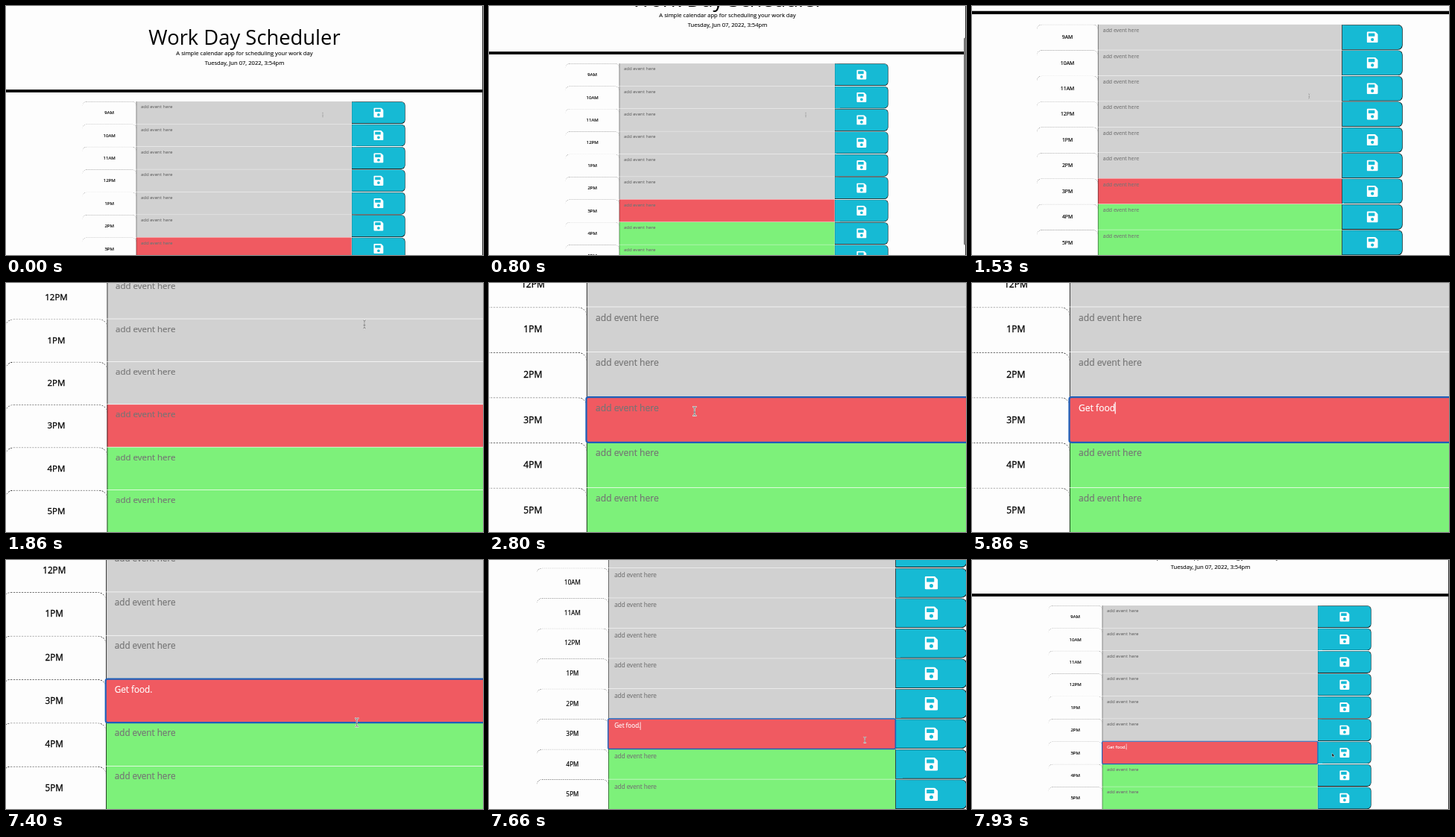
An HTML page for the animation above (8000 ms loop, 640 by 334 pixels).

```html
<!DOCTYPE html>
<html lang="en">
<head>
<meta charset="utf-8">
<title>Work Day Scheduler</title>
<style>
  html, body { margin: 0; width: 100%; height: 100%; overflow: hidden; background: #fdfdfd; }
  #stage { position: relative; width: 640px; height: 334px; overflow: hidden; }
  #camera { position: absolute; inset: 0; transform-origin: 219px 334px; }
  #page {
    position: absolute; left: 0; top: 0; width: 1684px; height: 1057px;
    transform-origin: 0 0; font: 16px/24px "Open Sans", sans-serif; color: #000;
  }
  header { position: absolute; inset: 0 0 auto; height: 295px; border-bottom: 10px solid #000; text-align: center; }
  header > * { position: absolute; left: 0; width: 100%; margin: 0; font-weight: 400; }
  h1 { top: 66px; font-size: 72px; line-height: 86.4px; }
  p { font-size: 20px; line-height: 30px; -webkit-text-stroke: .25px; }
  main { position: absolute; left: 270px; top: 336px; width: 1140px; -webkit-text-stroke: .25px; }
  .row { display: grid; grid-template-columns: 190px 760px 190px; height: 79px; border-top: 1px solid #fff; }
  .hour { border-top: 1px dashed #000; border-radius: 15px; text-align: center; line-height: 77px; -webkit-text-stroke: .4px; }
  .event { position: relative; box-sizing: border-box; padding: 6px 15px; border-left: 1px solid #000; color: #757575; white-space: pre; }
  .past { background: #d1d1d1; }
  .present { background: #f05a61; }
  .future { background: #7df17a; }
  .focus { outline: 3px solid #1f5fb8; outline-offset: -1px; border-radius: 3px; border-color: transparent; z-index: 1; }
  .typed { color: #fff; }
  #caret { position: absolute; width: 2px; height: 21px; margin: 2px 0 0 -1px; background: #fbdcde; }
  .save { box-sizing: border-box; border: 2px solid #111; border-top-color: #444; border-radius: 0 15px 15px 0; background: #16bad4; display: grid; place-items: center; }
  .save svg { width: 35px; height: 35px; }
  #edge { position: absolute; left: 639px; top: 0; width: 1px; height: 334px; background: #333; }
  #thumb { position: absolute; left: 636.5px; top: 0; width: 3px; height: 278px; border-radius: 2px; background: #777; }
  #pointer { position: absolute; left: 0; top: 0; width: 1px; height: 1px; overflow: visible; }
</style>
</head>
<body>
<div id="stage">
  <div id="camera">
    <div id="page">
      <header>
        <h1>Work Day Scheduler</h1>
        <p style="top:152px">A simple calendar app for scheduling your work day</p>
        <p style="top:187px">Tuesday, Jun 07, 2022, 3:54pm</p>
      </header>
      <main></main>
    </div>
    <div id="edge"></div>
    <div id="thumb"></div>
    <svg id="pointer">
      <g id="beam" fill="none">
        <path d="M-1.4-3Q0-3 0-2Q0-3 1.4-3M0-2V2M-1.4 3Q0 3 0 2Q0 3 1.4 3" stroke="#eee"/>
        <path d="M-1.2-3Q0-3 0-2Q0-3 1.2-3M0-2V2M-1.2 3Q0 3 0 2Q0 3 1.2 3M-.7 .6H.7" stroke="#666" stroke-width=".4"/>
      </g>
      <path id="arrow" d="M0 0V5L1.2 4 2 5.8 2.9 5.4 2.1 3.7H3.7Z" fill="#111" stroke="#fff" stroke-width=".4"/>
    </svg>
  </div>
</div>
<script>
const LOOP = 8000, PAGE_SCALE = 0.38, MAX_SCROLL = 67, MAX_ZOOM = 1.993;
const FOCUS_AT = 2200, MESSAGE = "Get food.";
const keyTimes = [...MESSAGE].map((_, i) => i < 8 ? 4200 + i * 200 : 6450);
// Pointer stops: time, x, y in unzoomed stage pixels
const stops = [[0, 425, 146], [1650, 425, 146], [2150, 247.5, 252.7], [7050, 247.5, 252.7], [7400, 350, 273.6], [7850, 483, 259]];

const $ = id => document.getElementById(id);
const clamp = v => Math.min(1, Math.max(0, v));
const ease = (t, start, end) => (1 - Math.cos(Math.PI * clamp((t - start) / (end - start)))) / 2;
const show = (node, on) => { node.style.display = on ? "" : "none"; };

const icon = `<svg viewBox="0 0 28 28"><path fill="#fff" fill-rule="evenodd" d="M3 0H19.8Q21 0 21.9.9L27.1 6.1Q28 7 28 8.2V25Q28 28 25 28H3Q0 28 0 25V3Q0 0 3 0ZM4.8 4Q4 4 4 4.8V11.2Q4 12 4.8 12H19.2Q20 12 20 11.2V5L19 4ZM14 16A4 4 0 0 0 14 24A4 4 0 0 0 14 16Z"/></svg>`;
const hours = ["9AM", "10AM", "11AM", "12PM", "1PM", "2PM", "3PM", "4PM", "5PM"];
document.querySelector("main").innerHTML = hours.map((hour, i) => {
  const phase = i < 6 ? "past" : i > 6 ? "future" : "present";
  return `<div class="row"><div class="hour">${hour}</div>
    <div class="event ${phase}">add event here</div><div class="save">${icon}</div></div>`;
}).join("");

const field = document.querySelector(".present");
field.innerHTML = `<span id="typed" class="typed"></span><span id="caret"></span><span id="hint">add event here</span>`;

function pointerAt(t) {
  let i = 0;
  while (i < stops.length - 2 && t >= stops[i + 1][0]) i++;
  const [from, to] = [stops[i], stops[i + 1]];
  const k = ease(t, from[0], to[0]);
  return [1, 2].map(n => from[n] + (to[n] - from[n]) * k);
}

function draw(t) {
  const scroll = MAX_SCROLL * ease(t, 430, 980);
  const zoom = 1 + (MAX_ZOOM - 1) * (ease(t, 1388, 1988) - ease(t, 7297, 7897));
  $("camera").style.transform = `scale(${zoom})`;
  $("page").style.transform = `translateY(${-scroll}px) scale(${PAGE_SCALE})`;
  $("thumb").style.transform = `translateY(${scroll * 334 / 401}px)`;
  $("thumb").style.opacity = clamp((t - 430) / 60) * clamp((1500 - t) / 200);

  const count = keyTimes.filter(time => time <= t).length;
  const lastInput = count ? keyTimes[count - 1] : FOCUS_AT;
  const focused = t >= FOCUS_AT;
  field.classList.toggle("focus", focused);
  $("typed").textContent = MESSAGE.slice(0, count);
  show($("hint"), !count);
  show($("caret"), focused && (t - lastInput) % 1000 < 500);

  const [x, y] = pointerAt(t);
  const overButton = x > 464;
  $("pointer").style.transform = `translate(${x}px, ${y}px)`;
  show($("pointer"), t < keyTimes[0] || t >= 7050);
  show($("beam"), !overButton);
  show($("arrow"), overButton);
}

const start = performance.now();
function frame() {
  draw((performance.now() - start) % LOOP);
  requestAnimationFrame(frame);
}
frame();
</script>
</body>
</html>
```
